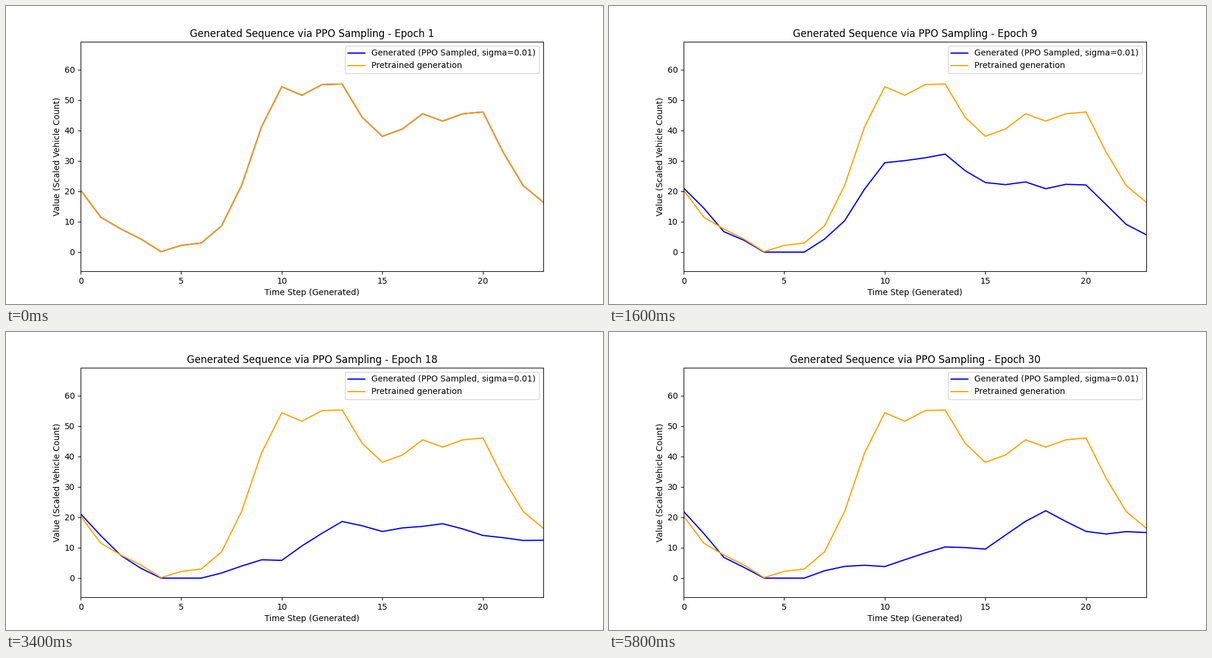
Animation, 1000 px wide and 500 px high, one loop 6 s. Source, as a matplotlib script:

```python
import numpy as np
import matplotlib.pyplot as plt
from matplotlib.animation import FuncAnimation

STEPS = 24
EPOCHS = 30
INTERVAL = 200
JITTER = 0.4   # sampling noise
DECAY = 6      # epochs over which the pretrained detail fades

x = np.arange(STEPS)
pretrained = np.array([
    20.4, 11.5, 7.6, 4.3, 0.15, 2.2, 3.0, 8.6, 21.9, 41.3, 54.4, 51.6,
    55.1, 55.3, 44.3, 38.1, 40.5, 45.5, 43.1, 45.5, 46.1, 32.9, 21.9, 16.4])

# The sampled curve bends at these steps: a fixed morning, a changing day
bends = np.array([0, 1, 2, 4, 6, 8, 10, 13, 15, 18, 20, 23])
morning = [21.3, 14.4, 7.2, 0, 0]
base = pretrained[bends]
detail = pretrained - np.interp(x, bends, base)


def with_morning(day):
    return np.concatenate([morning, day])


stages = {
    1: base,
    6: with_morning(0.84 * base[len(morning):]),
    9: with_morning([10.4, 30, 31.5, 22.8, 21, 22.2, 5]),
    14: with_morning([2.9, 10.7, 22.1, 19.6, 16.7, 16.2, 13.2]),
    21: with_morning([3.7, 2.8, 16.2, 11.8, 18.8, 12.4, 11.8]),
    26: with_morning([0, 0, 7, 4.1, 19.8, 23.9, 18.4]),
    30: with_morning([3.8, 3.8, 10.2, 9.4, 22.2, 15.2, 15.2]),
}
stage_epochs = list(stages)
stage_values = np.array(list(stages.values()))


def sample(epoch):
    """Trend between stages, fading pretrained detail and growing noise."""
    points = [np.interp(epoch, stage_epochs, col) for col in stage_values.T]
    trend = np.interp(x, bends, points)
    fade = np.exp(-(epoch - 1) / DECAY)
    noise = np.random.default_rng(epoch).normal(0, JITTER, STEPS)
    wiggle = fade * detail + (1 - fade) * noise
    return np.maximum(trend + wiggle * (trend > 0.5), 0)


fig, ax = plt.subplots(figsize=(10, 5), dpi=100)
generated, = ax.plot(x, pretrained, color="blue",
                     label="Generated (PPO Sampled, sigma=0.01)")
ax.plot(x, pretrained, color="orange", label="Pretrained generation")
ax.set_xlim(0, STEPS - 1)
ax.set_ylim(-6.29, 69.2)
ax.set_xlabel("Time Step (Generated)")
ax.set_ylabel("Value (Scaled Vehicle Count)")
ax.legend(loc="upper right")
title = ax.set_title("")


def update(frame):
    epoch = frame + 1
    generated.set_ydata(sample(epoch))
    title.set_text(f"Generated Sequence via PPO Sampling - Epoch {epoch}")
    return generated, title


anim = FuncAnimation(fig, update, frames=EPOCHS, interval=INTERVAL,
                     init_func=lambda: update(0), repeat=True, repeat_delay=0)
plt.show()
```
